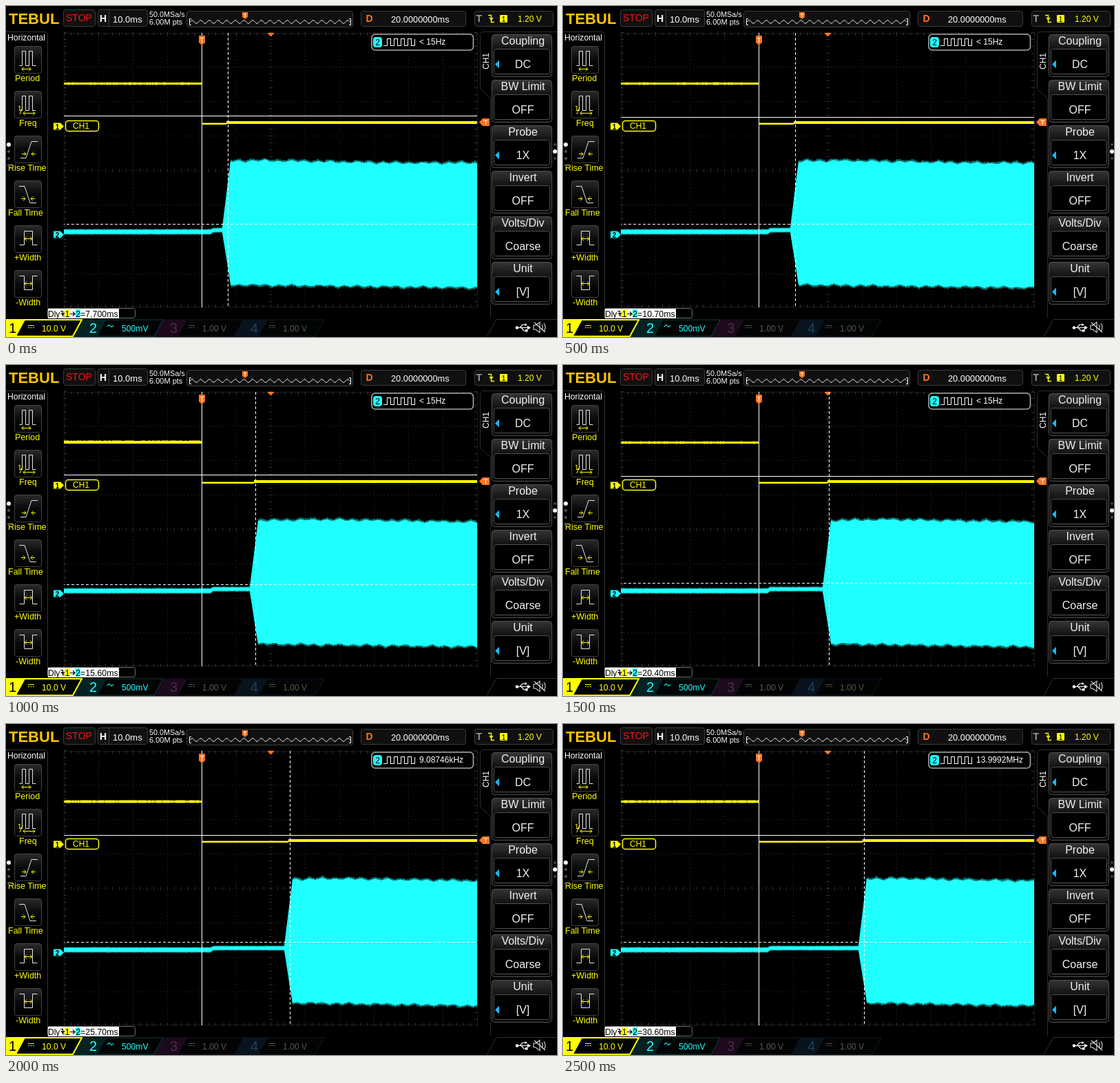
An HTML page for the animation above (3 s loop, 800 px wide and 480 px high).

```html
<!DOCTYPE html>
<html lang="en">
<head>
<meta charset="utf-8">
<title>Oscilloscope delay</title>
<style>
html, body { margin: 0; width: 100%; height: 100%; overflow: hidden; background: #000; }
svg { display: block; width: 800px; height: 480px; font-family: "Liberation Sans", Arial, sans-serif; }
text { white-space: pre; }
</style>
</head>
<body>
<svg id="scope" viewBox="0 0 800 480" xmlns="http://www.w3.org/2000/svg">
  <defs>
    <linearGradient id="head" x2="0" y2="1">
      <stop offset="0" stop-color="#343434"/><stop offset=".34" stop-color="#121212"/><stop offset="1" stop-color="#0a0a0a"/>
    </linearGradient>
    <linearGradient id="tile" x2="0" y2="1">
      <stop offset="0" stop-color="#2a2a2a"/><stop offset=".5" stop-color="#0a0a0a"/><stop offset="1" stop-color="#000"/>
    </linearGradient>
  </defs>
</svg>
<script>
const YEL = '#ffff00', CYAN = '#20ffff', ORG = '#ff7420', WHITE = '#fff';
const svg = document.getElementById('scope');

function add(tag, attrs, parent = svg) {
  const el = document.createElementNS(svg.namespaceURI, tag);
  for (const k in attrs) el.setAttribute(k, attrs[k]);
  parent.appendChild(el);
  return el;
}
const rect = (x, y, width, height, fill, more) => add('rect', { x, y, width, height, fill, ...more });
const line = (d, stroke, w = 1, more) => add('path', { d, stroke, fill: 'none', 'stroke-width': w, ...more });
const shape = (d, fill, more) => add('path', { d, fill, ...more });
const dot = (cx, cy, r, fill) => add('circle', { cx, cy, r, fill });
const CRISP = { 'shape-rendering': 'crispEdges' };
function text(s, x, y, size, fill, more) {
  const el = add('text', { x, y, 'font-size': size, fill, ...more });
  el.textContent = s;
  return el;
}
const BOLD = { 'font-weight': 'bold' }, MID = { 'text-anchor': 'middle' };

// graticule
const dots = { 'stroke-dasharray': '1 4', ...CRISP }, ticks = { 'stroke-dasharray': '1 9', ...CRISP };
for (let x = 134; x < 684; x += 50) line(`M${x + .5} 38V437`, '#303030', 1, dots);
for (let y = 88; y < 437; y += 50) line(`M84 ${y + .5}H684`, '#303030', 1, dots);
for (const [d, w] of [['M84 238.5H685', 5], ['M384.5 38V437', 5], ['M84 41H685', 4], ['M84 435H685', 4], ['M86 38V437', 4], ['M682 38V437', 4]])
  line(d, '#303030', w, ticks);
line('M84.5 39.5H684.5V436.5H84.5Z', '#303030', 1, { 'stroke-dasharray': '1 1', ...CRISP });

// traces
const fuzzHigh = line('', '#77770a', 5, CRISP), high = line('', YEL, 2, CRISP);
const lowDim = line('', '#77770a', 3, CRISP), low = line('', YEL, 2, CRISP), lowThick = line('', YEL, 4, CRISP);
const fringe = shape('', '#0b7672'), body = shape('', CYAN);

// top markers and cursors
shape('M379 39H390L384.5 44.5Z', ORG);
const hCursor = line('', WHITE, 1, CRISP);
const hDash = line('', WHITE, 1, { 'stroke-dasharray': '4 3', 'stroke-dashoffset': 3, ...CRISP });
line('M284.5 39V437', WHITE, 1, CRISP);
const vDash = line('', WHITE, 1, { 'stroke-dasharray': '4 3', ...CRISP });
shape('M280 43H289V53L284.5 57L280 53Z', ORG);
line('M282 46.5H287M284.5 46V53', WHITE);

// channel flags
function flag(n, y, color) {
  shape(`M69 ${y - 5}H79L84 ${y}L79 ${y + 5}H69Z`, color);
  text(n, 74.5, y + 4, 10, '#000', { ...MID, ...BOLD });
}
flag(1, 174.5, YEL);
flag(2, 331.5, CYAN);
rect(86.5, 166.5, 48, 15, '#000', { rx: 4, stroke: YEL, 'stroke-width': 1.5 });
text('CH1', 97, 178, 12, YEL);
shape('M687 168.5L692 163H702V174H692Z', ORG);
line('M693.5 166H699.5M696.5 166V172', WHITE);

// frequency counter
rect(531, 41, 147.5, 23, '#000', { rx: 5, stroke: '#a8a8a8', 'stroke-width': 1.6 });
rect(533, 45, 13, 15, CYAN, { rx: 4 });
text('2', 539.5, 57, 12, '#000', MID);
line('M548 57.5h5' + 'v-10h5v10h5'.repeat(4) + 'v-10', WHITE, 1, CRISP);
const freq = text('', 600, 56, 12, WHITE);

// top bar
const panel = (x, y, w, h) => rect(x + .5, y + .5, w, h, '#101010', { rx: 3, stroke: '#3c3c3c' });
text('TEBUL', 4, 26, 22, '#ffc400', BOLD);
panel(83, 5, 46, 24);
text('STOP', 87, 22, 14, '#ff1010');
panel(133, 5, 72, 24);
text('H', 136, 23, 14, WHITE, BOLD);
line('M149.5 6V29', '#3c3c3c');
text('10.0ms', 155, 24, 13, WHITE);
text('50.0MSa/s', 208, 16, 10.8, WHITE);
text('6.00M pts', 208, 27, 11, WHITE);
panel(262, 7, 241, 23);
let wave = 'M267 23';
for (let x = 267; x <= 500; x++) wave += `L${x} ${(23 - 2.3 * Math.sin((x - 267) * .5)).toFixed(1)}`;
line(wave, '#e8e8e8');
line('M269 18.5H266.5V27.5H269M498 18.5H500.5V27.5H498', WHITE);
shape('M343 9H351V16L347 19L343 16Z', ORG);
line('M345 11.5H349M347 11V16', WHITE);
panel(515, 7, 152, 22);
text('D', 522.5, 23, 14, ORG, BOLD);
text('20.0000000ms', 559, 24, 12.8, WHITE);
panel(680, 7, 114, 22);
text('T', 682.5, 23, 14, '#999', BOLD);
line('M700 13.5H704.5V23.5H709M702 17L704.5 20L707 17', YEL, 1.4);
rect(717, 13, 11, 11, YEL, { rx: 1 });
text('1', 722.5, 22.5, 11, '#000', MID);
text('1.20 V', 743, 23, 12, YEL);

// left menu
line('M0 37.5H56Q60.5 38 60.5 43V452', '#343434');
text('Horizontal', 2, 50, 12.2, WHITE);
const arrow = (a, b, y) => `M${a} ${y}H${b}M${a + 3} ${y - 3}L${a} ${y}L${a + 3} ${y + 3}M${b - 3} ${y - 3}L${b} ${y}L${b - 3} ${y + 3}`;
const squeeze = (a, b, y) => `M${a - 6} ${y}H${a}M${a - 3} ${y - 3}L${a} ${y}L${a - 3} ${y + 3}M${b + 6} ${y}H${b}M${b + 3} ${y - 3}L${b} ${y}L${b + 3} ${y + 3}`;
const pulses = 'M19.5 28.5h4v-21h5v21h5v-21h5v21h5';
const menu = [
  ['Period', 13, pulses, arrow(23, 36, 33.5)],
  ['Freq', 19, pulses, arrow(25, 42, 32.5) + 'M18 23l2-1v7M24 24L20 34'],
  ['Rise Time', 3, 'M21 32.5h8L37 8.5h9', squeeze(29, 37, 26.5)],
  ['Fall Time', 3, 'M19 8.5h8L35 32.5h9', squeeze(28, 36, 26.5)],
  ['+Width', 12, 'M19.5 28.5h7v-20h12v20h7', arrow(27, 38, 19.5)],
  ['-Width', 14, 'M19.5 8.5h7v20h12v-20h7', arrow(27, 38, 19.5)]
];
menu.forEach(([name, x, icon, mark], i) => {
  const y = 58 + 65 * i, at = { transform: `translate(0 ${y})` };
  rect(12.5, y + .5, 39, 39, 'url(#tile)', { rx: 3, stroke: '#444' });
  line(icon, '#e4e4e4', 1, at);
  line(mark, YEL, 1, at);
  text(name, x, y + 51, 12.5, YEL);
});
[201, 211, 221, 231].forEach((y, i) => dot(4, y, i ? 2 : 3, i ? '#555' : WHITE));

// right menu
line('M800 37.5H693Q688.5 38 688.5 43V120L703.5 134V452', '#2e2e2e');
text('CH1', 0, 0, 12, WHITE, { transform: 'translate(700.5 92) rotate(-90)' });
const settings = [['Coupling', 'DC', 1], ['BW Limit', 'OFF'], ['Probe', '1X', 1], ['Invert', 'OFF'], ['Volts/Div', 'Coarse'], ['Unit', '[V]', 1]];
settings.forEach(([name, value, more], i) => {
  const y = 41 + 66 * i;
  rect(705.5, y + .5, 87, 61, 'url(#head)', { rx: 4, stroke: '#505050' });
  rect(708.5, y + 21.5, 81, 36, '#000', { rx: 3, stroke: '#505050' });
  text(name, 750.5, y + 15, 16, '#f0f0f0', MID);
  text(value, 750.5, y + 48.5, 16, '#f0f0f0', MID);
  if (more) shape(`M710 ${y + 43.5}L716 ${y + 37.5}V${y + 49.5}Z`, '#18b8f8');
});
[201, 221].forEach(y => dot(797, y, 2, '#444'));
dot(797, 211, 3, WHITE);

// delay readout
rect(60.5, 438.5, 127, 14, '#000', { rx: 3, stroke: '#707070' });
rect(61, 439, 103, 14, WHITE);
text('Dly', 61, 451, 12, '#000');
line('M79 442.5H82.5V449.5H86M80 445L82.5 448L85 445', '#000', 1.2);
rect(85, 440, 8, 12, YEL);
text('1', 89, 451, 12, '#000', MID);
line('M93 446.5H100M97 443.5L100 446.5L97 449.5', '#000', 1.2);
rect(101, 440, 7, 12, CYAN);
text('2', 104.5, 451, 12, '#000', MID);
const delay = text('', 108, 451, 12.4, '#000');

// bottom bar: a slanted tab with a tinted cell for the channel number
function channel(n, x, { ink, edge, cell, digit }, value, vx, ac) {
  const slant = w => `M${x} 455H${x + w}L${x + w - 13} 479H${x - 13}Z`;
  shape(slant(118), '#020404', { stroke: edge, 'stroke-width': n === 1 ? 2 : 1 });
  shape(slant(36), cell);
  text(n, n === 1 ? 4 : x + 11, 474, 20, digit);
  const sx = vx - 20;
  if (ac) line(`M${sx - 1} 465q2.5-4 4.5-1t4.5-1`, ink, 1.2);
  else line(`M${sx} 463.5h9M${sx} 466.5h2m1.5 0h2m1.5 0h2`, ink);
  text(value, vx, 472, 12.2, ink);
}
channel(4, 344, { ink: '#555', edge: '#0c1b28', cell: '#08131e', digit: '#21405a' }, '1.00 V', 402);
channel(3, 227, { ink: '#555', edge: '#211026', cell: '#1a0a1c', digit: '#512854' }, '1.00 V', 285);
channel(2, 110, { ink: CYAN, edge: '#0a4040', cell: '#042222', digit: CYAN }, '500mV', 168, true);
channel(1, -8, { ink: YEL, edge: YEL, cell: YEL, digit: '#000' }, '10.0 V', 52);
line('M0 455H110', YEL, 2);
line('M0 479H97', YEL, 2);
line('M800 454.5H712L698 479.5', '#303030');
line('M741 466.5H758M746 466.5L750 462H754M748 466.5L752 471H755', WHITE, 1.2);
dot(742, 466.5, 2.3, WHITE);
dot(754.5, 462, 1.6, WHITE);
rect(754, 469, 3.5, 3.5, WHITE);
shape('M757 463.5L762 466.5L757 469.5Z', WHITE);
line('M766 463H769L775 458.5V473.5L769 469H766ZM778 462Q780.5 466 778 470M781 460Q785 466 781 472', '#ddd', 1.1);
line('M767 459L783 473', '#ddd', 1.2);

// one capture per half second
const shots = [
  { x: 322, delay: '7.700', freq: '< 15Hz', start: 314, peak: 370 },
  { x: 337, delay: '10.70', freq: '< 15Hz', start: 330, peak: 400, solid: 161 },
  { x: 362, delay: '15.60', freq: '< 15Hz', start: 354, peak: 460, dash: 318, high: 111 },
  { x: 386, delay: '20.40', freq: '< 15Hz', start: 377, peak: 470, solid: 161 },
  { x: 412, delay: '25.70', freq: '9.08746kHz', start: 404, peak: 480, solid: 161 },
  { x: 437, delay: '30.60', freq: '13.9992MHz', start: 429, peak: 475, solid: 161 }
];

const noise = (x, k) => { const v = Math.sin(x * 12.9898 + k * 78.233) * 43758.5453; return v - Math.floor(v); };
const bump = (x, k) => Math.round(1.1 * Math.sin(x * .33 + k) + .6 * Math.sin(x * .131 + 2 * k));

// half envelope of channel 2; side is -1 above and 1 below
function edge(x, shot, k, side) {
  if (x < shot.start) {
    const step = Math.min(1, Math.max(0, (x - 297) / 4));
    return 327.5 - 2.5 * step + side * (3 - .5 * step);
  }
  const grow = Math.min(1, (x - shot.start) / 12);
  const full = side < 0
    ? 224.5 + 3.5 * Math.min(1, Math.abs(x - shot.peak) / 200) + bump(x, k)
    : 403.5 + 4.5 * (x - shot.start) / (684 - shot.start) + bump(x + 9, k + 3);
  const from = 325 + side * 2.5;
  return from + (full - from) * grow;
}

function outline(shot, k, spread) {
  const top = [], bottom = [];
  for (let x = 84; x <= 684; x++) {
    const amp = x < shot.start ? .5 : 1;
    const off = side => spread ? side * amp * (1.2 + 2.2 * noise(x, k + side)) : 0;
    top.push(`${x} ${(edge(x, shot, k, -1) + off(-1)).toFixed(1)}`);
    bottom.push(`${x} ${(edge(x, shot, k, 1) + off(1)).toFixed(1)}`);
  }
  return 'M' + top.concat(bottom.reverse()).join('L') + 'Z';
}

let shown = -1;
function draw(ms) {
  const k = Math.floor(ms % 3000 / 500);
  if (k === shown) return;
  shown = k;
  const s = shots[k], y = s.high || 112;
  let fuzz = '';
  for (let x = 84; x < 284; x += 2) if (noise(x, k) > (k === 2 || k > 3 ? .3 : .8)) fuzz += `M${x} ${y + .5}h2`;
  fuzzHigh.setAttribute('d', fuzz);
  high.setAttribute('d', `M84 ${y + .5}H284`);
  high.setAttribute('stroke-width', s.high ? 4 : 3);
  lowDim.setAttribute('d', `M285 170.5H${s.x - 2}`);
  low.setAttribute('d', `M285 171H${s.x - 2}`);
  lowThick.setAttribute('d', `M${s.x - 2} 169H684`);
  fringe.setAttribute('d', outline(s, k, true));
  body.setAttribute('d', outline(s, k, false));
  hCursor.setAttribute('d', `M84 ${(s.solid || 159) + .5}H684`);
  hDash.setAttribute('d', `M84 ${(s.dash || 316) + .5}H684`);
  vDash.setAttribute('d', `M${s.x + .5} 39V437`);
  freq.textContent = s.freq;
  delay.textContent = `=${s.delay}ms`;
}

const begin = performance.now();
function tick() {
  draw(performance.now() - begin);
  requestAnimationFrame(tick);
}
tick();
</script>
</body>
</html>
```
